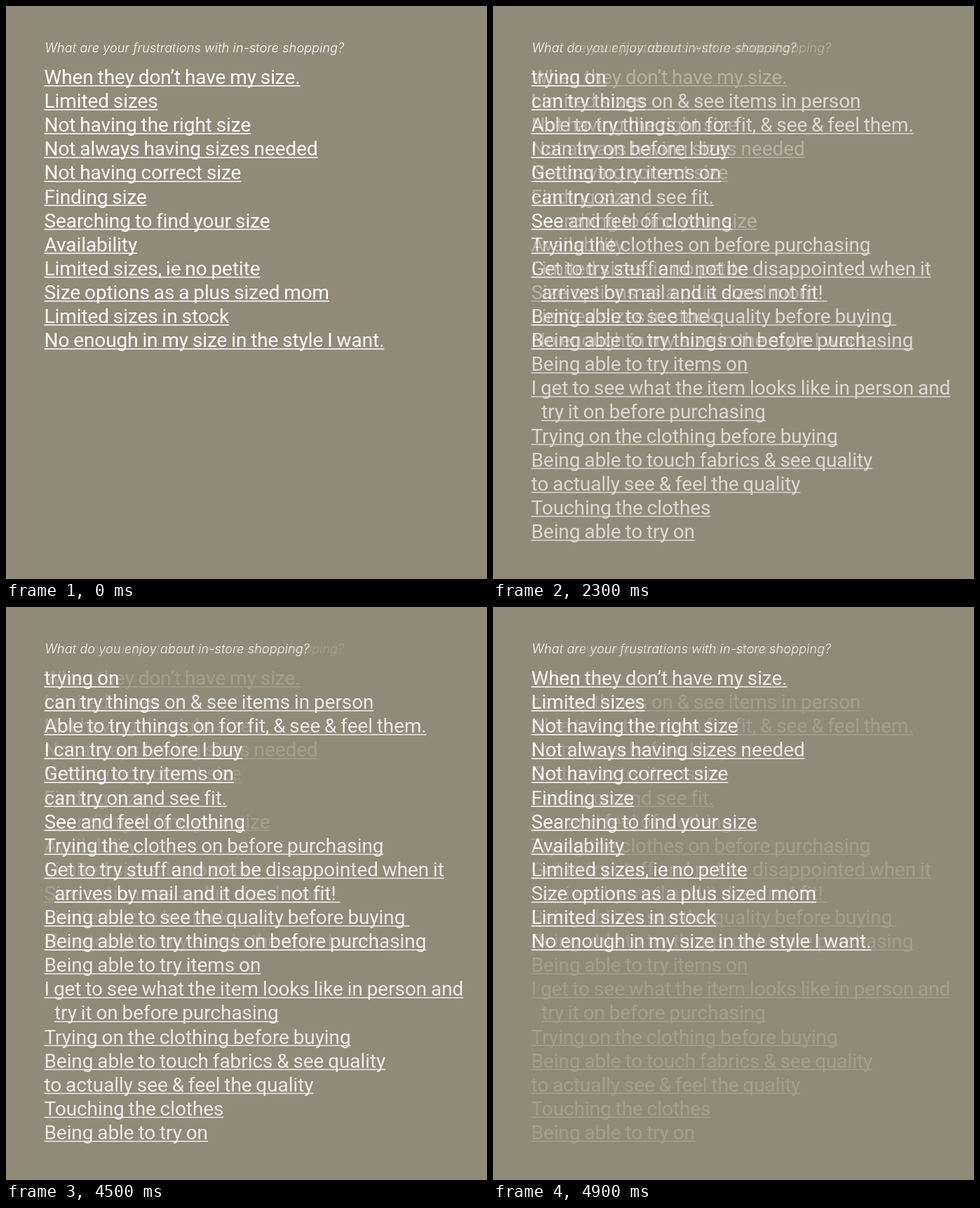
Recreate the animation shown at these times as an HTML page. Size 686 by 817 pixels, loop 5000 ms.

```html
<!DOCTYPE html>
<html lang="en">
<head>
<meta charset="utf-8">
<title>In-store shopping answers</title>
<style>
  html, body { margin: 0; width: 100%; height: 100%; overflow: hidden; background: #928a78; }
  svg { display: block; isolation: isolate; fill: #fff; }
  g { mix-blend-mode: plus-lighter; }
  text { white-space: pre; }
  .question { font: italic 300 18px Inter, sans-serif; letter-spacing: .12px; }
  .answer { font: 400 28px Roboto, sans-serif; letter-spacing: -.08px; word-spacing: -1px; }
</style>
</head>
<body>
<svg width="686" height="817" viewBox="0 0 686 817"></svg>
<script>
const LEFT = 54.5, INDENT = 14.5, FIRST_BASELINE = 111, LINE_HEIGHT = 34.1;
const HOLD = 2000, FADE = 500, STEP = 100, LOOP = 2 * (HOLD + FADE);

// A leading tab marks an indented continuation line.
const frustrations = {
  question: "What are your frustrations with in-store shopping?",
  answers: [
    "When they don’t have my size.",
    "Limited sizes",
    "Not having the right size",
    "Not always having sizes needed",
    "Not having correct size",
    "Finding size",
    "Searching to find your size",
    "Availability",
    "Limited sizes, ie no petite",
    "Size options as a plus sized mom",
    "Limited sizes in stock",
    "No enough in my size in the style I want."
  ]
};

const joys = {
  question: "What do you enjoy about in-store shopping?",
  answers: [
    "trying on",
    "can try things on & see items in person",
    "Able to try things on for fit, & see & feel them.",
    "I can try on before I buy",
    "Getting to try items on",
    "can try on and see fit.",
    "See and feel of clothing",
    "Trying the clothes on before purchasing",
    "Get to try stuff and not be disappointed when it",
    "\tarrives by mail and it does not fit! ",
    "Being able to see the quality before buying ",
    "Being able to try things on before purchasing",
    "Being able to try items on",
    "I get to see what the item looks like in person and",
    "\ttry it on before purchasing",
    "Trying on the clothing before buying",
    "Being able to touch fabrics & see quality",
    "to actually see & feel the quality",
    "Touching the clothes",
    "Being able to try on"
  ]
};

function add(parent, tag, attributes, content = "") {
  const node = document.createElementNS("http://www.w3.org/2000/svg", tag);
  for (const name in attributes) node.setAttribute(name, attributes[name]);
  node.textContent = content;
  return parent.appendChild(node);
}

function buildPage({ question, answers }) {
  const page = add(document.querySelector("svg"), "g", {});
  add(page, "text", { class: "question", x: 55.5, y: 66 }, question);
  answers.forEach((answer, i) => {
    const x = LEFT + (answer[0] === "\t" ? INDENT : 0);
    const y = FIRST_BASELINE + i * LINE_HEIGHT;
    const line = add(page, "text", { class: "answer", x, y: Math.round(y) }, answer.replace("\t", ""));
    add(page, "rect", { x, y: y + 2.1, width: line.getComputedTextLength(), height: 1.5 });
  });
  return page;
}

const firstPage = buildPage(frustrations);
const secondPage = buildPage(joys);

// Holds at 0, then climbs in sixths during the fade.
function fadeProgress(time) {
  return time < HOLD ? 0 : (Math.floor((time - HOLD) / STEP) + 1) / 6;
}

function draw() {
  const time = performance.now() % LOOP, half = LOOP / 2;
  const mix = time < half ? fadeProgress(time) : 1 - fadeProgress(time - half);
  firstPage.style.opacity = 1 - mix;
  secondPage.style.opacity = mix;
  requestAnimationFrame(draw);
}
draw();
</script>
</body>
</html>
```
